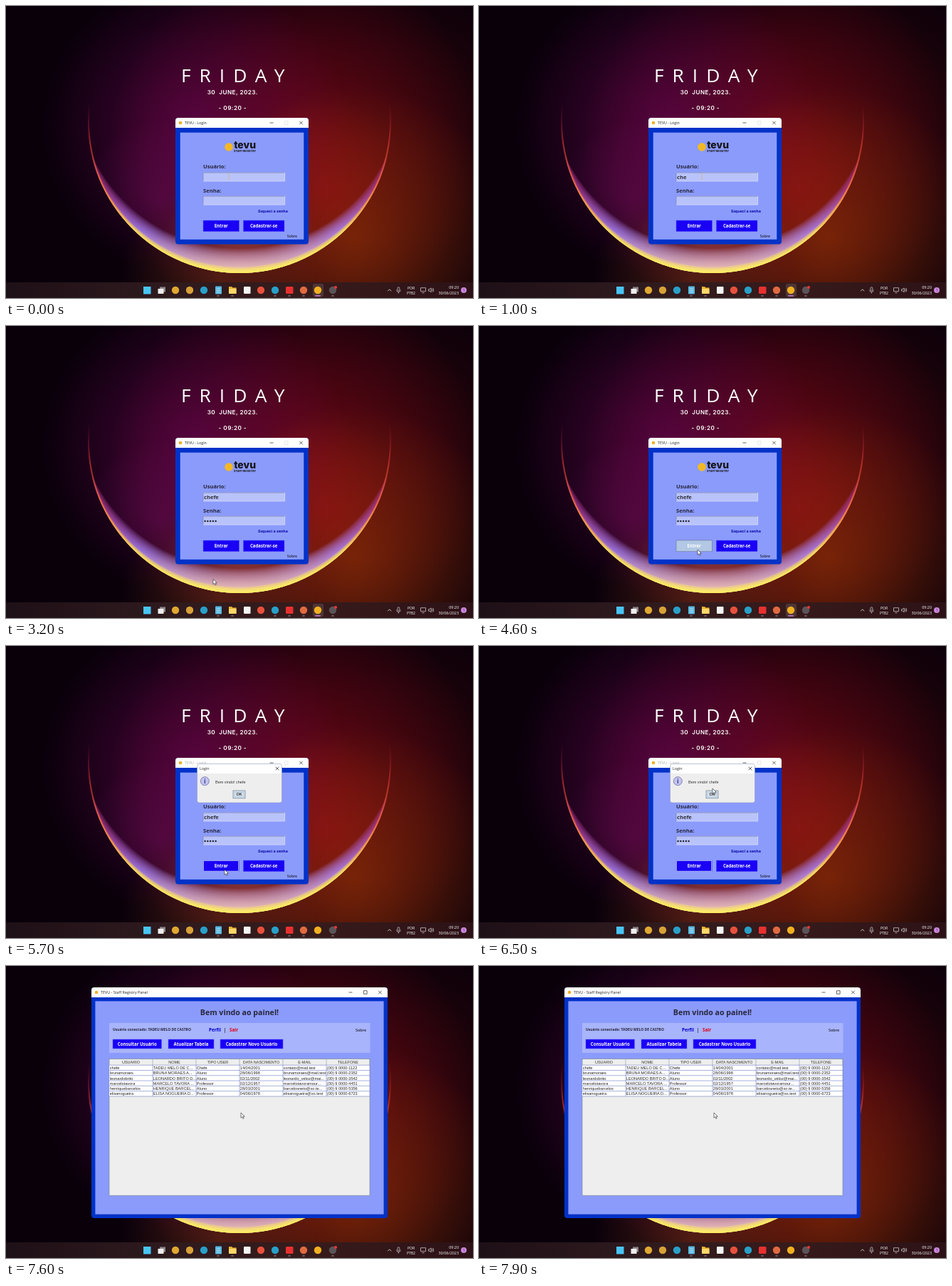
Recreate the animation shown at these times as an HTML page with a canvas. Size 656 by 410 pixels, loop 8000 ms.

```html
<!DOCTYPE html>
<html lang="pt-BR">
<head>
<meta charset="utf-8">
<title>Login</title>
<style>
html, body { margin: 0; width: 100%; height: 100%; overflow: hidden; background: #08000a; }
canvas, svg { position: absolute; left: 0; top: 0; width: 656px; height: 410px; }
text { white-space: pre; font-family: "Open Sans", "Noto Sans", sans-serif; }
.b { font-weight: 700; }
.m { font-weight: 600; }
.arial { font-family: "Liberation Sans", Arial, sans-serif; }
.geo { font-family: Inter, sans-serif; font-weight: 600; letter-spacing: .45px; }
.logo { font-family: Inter, sans-serif; font-weight: 800; }
.wide { letter-spacing: 12px; }
</style>
</head>
<body>
<canvas id="wall" width="656" height="410"></canvas>
<svg id="stage" viewBox="0 0 656 410"></svg>
<script>
const LOOP = 8000;
const BLUE = '#0032c8', PANEL = '#8b9bfc', BUTTON = '#1a00f5', INK = '#26263a';

// Wallpaper
const g = document.getElementById('wall').getContext('2d');

function glow(x, y, r, rgb, alpha) {
  const grad = g.createRadialGradient(x, y, 0, x, y, r);
  grad.addColorStop(0, `rgba(${rgb},${alpha})`);
  grad.addColorStop(0.5, `rgba(${rgb},${alpha * 0.5})`);
  grad.addColorStop(1, `rgba(${rgb},0)`);
  g.fillStyle = grad;
  g.fillRect(0, 0, 656, 410);
}

function vertical(stops) {
  const grad = g.createLinearGradient(0, 135, 0, 375);
  stops.forEach((c, i) => grad.addColorStop(i / (stops.length - 1), c));
  return grad;
}

function paintWall() {
  const cx = 328, cy = 162, R = 213, layers = 24;
  g.fillStyle = '#09000a';
  g.fillRect(0, 0, 656, 410);
  glow(410, 195, 265, '128,4,28', 0.85);
  glow(265, 170, 215, '98,6,78', 0.75);
  glow(530, 200, 270, '96,14,10', 0.45);
  glow(490, 325, 215, '150,52,4', 0.65);
  glow(300, 385, 140, '130,55,25', 0.5);

  g.save();
  g.beginPath();
  g.arc(cx, cy, R, 0, Math.PI * 2);
  g.clip();
  glow(450, 260, 130, '165,16,24', 0.4);
  glow(215, 270, 110, '120,16,100', 0.4);
  glow(328, 365, 120, '200,90,110', 0.45);

  const rim = vertical(['#a0144000', '#e03c34', '#f57838', '#ffe050', '#fff060']);
  const haze = vertical(['#7a106000', '#a02060', '#a83c98', '#b088ff', '#ffd8c8']);
  for (let i = layers; i > 0; i--) {
    const t = i / layers, isRim = t < 0.28;
    g.globalAlpha = isRim ? 0.3 : 0.09;
    g.fillStyle = isRim ? rim : haze;
    g.beginPath();
    g.rect(0, 0, 656, 410);
    g.arc(cx, cy - 50 * t, R + 16 * t, 0, Math.PI * 2);
    g.fill('evenodd');
  }
  g.globalAlpha = 0.65;
  g.strokeStyle = rim;
  g.lineWidth = 4;
  g.beginPath();
  g.arc(cx, cy, R, 0, Math.PI * 2);
  g.stroke();
  g.restore();

  const bar = g.createLinearGradient(0, 0, 656, 0);
  ['#1e1017', '#2e1a1e', '#371b1b', '#2c1116'].forEach((c, i) => bar.addColorStop(i / 3, c));
  g.fillStyle = bar;
  g.fillRect(0, 388, 656, 22);
}

// Markup helpers; text is placed by its vertical centre
const rect = (x, y, w, h, fill, more = '') =>
  `<rect x="${x}" y="${y}" width="${w}" height="${h}" fill="${fill}" ${more}/>`;
const dot = (x, y, r, fill, more = '') => `<circle cx="${x}" cy="${y}" r="${r}" fill="${fill}" ${more}/>`;
const line = (d, stroke, w = 0.7) => `<path d="${d}" fill="none" stroke="${stroke}" stroke-width="${w}"/>`;
const text = (x, y, size, str, fill = INK, cls = '', anchor = 'start', id = '') =>
  `<text x="${x}" y="${y + size * 0.36}" font-size="${size}" fill="${fill}" class="${cls}" text-anchor="${anchor}" ${id && `id="${id}"`}>${str}</text>`;
const group = (id, body) => `<g id="${id}">${body}</g>`;

const button = (x, y, w, h, label, size = 6.1) =>
  rect(x, y, w, h, BUTTON, 'stroke="#5a5cff" stroke-width=".5"') +
  text(x + w / 2, y + h / 2, size, label, '#fff', 'b', 'middle');

const field = (y) =>
  rect(277, y, 115, 12.5, '#b9c3fb') +
  line(`M277 ${y + 12.5}V${y + 0.4}H392`, '#7f86a8') +
  line(`M277 ${y + 12.2}H391.7V${y}`, '#d4dafc');

const cross = (x, y, c = '#222') =>
  line(`M${x - 2.3} ${y - 2.3}l4.6 4.6m0-4.6l-4.6 4.6`, c);

const frame = (x, y, w, h, inset, title, maxColor) =>
  rect(x, y, w, h, BLUE, 'rx="4"') +
  `<path d="M${x} ${y + 14}v-10q0-4 4-4h${w - 8}q4 0 4 4v10z" fill="#fff"/>` +
  rect(x + inset, y + 14 + inset, w - 2 * inset, h - 14 - 2 * inset, PANEL) +
  dot(x + 7, y + 7, 2.3, '#f0b020') + title +
  line(`M${x + w - 54.5} ${y + 7}h5`, '#222') +
  line(`M${x + w - 33.5} ${y + 4.7}h4.6v4.6h-4.6z`, maxColor) +
  cross(x + w - 10.5, y + 7);

// Scene parts
const desktop =
  text(246, 98, 26.3, 'FRIDAY', '#fff', 'wide') +
  text(318.3, 121, 8.2, '30  JUNE, 2023.', '#fff', 'geo', 'middle') +
  text(318.3, 143, 8.2, '- 09:20 -', '#fff', 'geo', 'middle');

const icons = [
  [238, '#e0a830'], [258, '#d8a038'], [278, '#28a0c8'], [378, '#28a0c8'],
  [358, '#e8503c'], [418, '#e06a40'], [438, '#f0b020'], [459, '#5a5458']
];
const taskbar =
  rect(193, 394, 10.5, 10.5, '#48c4f4') +
  rect(216, 394.5, 8, 7, '#8c8688') + rect(213.5, 397, 8, 7, '#f0eeee') +
  group('activeApp', rect(431, 390, 15, 18, '#fff', 'opacity=".12" rx="2"') + rect(434, 406.3, 8, 1.4, '#d080e0', 'rx=".7"')) +
  icons.map(([x, c]) => dot(x, 399, 5.2, c)).join('') +
  rect(294, 393.5, 9, 11, '#58b8e0', 'rx="1"') + line('M296 397h5m-5 2.5h5m-5 2.5h5', '#e8f6ff', 0.6) +
  '<path d="M313 394h4l1.5 1.5h5v8.5h-10.5z" fill="#e8b030"/>' + rect(313, 397, 10.5, 7, '#ffd868', 'rx=".7"') +
  rect(334, 394, 9.5, 10, '#f4f4f4', 'rx="1"') +
  rect(393, 394, 10.5, 10, '#e83030', 'rx="1.5"') +
  dot(463, 395, 2.1, '#e83838') +
  [298, 318, 378, 398, 418, 459].map(x => rect(x - 1.7, 406.5, 3.4, 1, '#a8a0a2', 'rx=".5"')).join('') +
  line('M536.2 400.3l2.5-2.5 2.5 2.5', '#eee', 0.8) +
  rect(550, 394.8, 2.8, 5, 'none', 'rx="1.4" stroke="#ddd" stroke-width=".7"') +
  line('M548.7 398.6q0 3 2.7 3t2.7-3m-2.7 3v2', '#ddd') +
  text(569, 396, 5.1, 'POR', '#fff', '', 'middle') + text(569, 403, 5.1, 'PTB2', '#fff', '', 'middle') +
  line('M582.5 395.7h7v5h-7zm2 7h3', '#ddd') +
  line('M593.5 397.7h1.6l2-1.8v6l-2-1.8h-1.6zm5-.5q1 1.6 0 3.2m1.3-4.4q1.8 2.8 0 5.6', '#ddd') +
  text(636, 395.3, 5.4, '09:20', '#fff', '', 'end') + text(636, 403, 5.4, '30/06/2023', '#fff', '', 'end') +
  dot(643, 399, 4, '#c987dc') + text(643, 399, 4.8, '1', '#301838', '', 'middle');

const login =
  frame(238, 157, 187, 177.5, 6.7, text(251, 164, 5.3, 'TEVU - Login', '#222', '', 'start', 'loginTitle'), '#ddd') +
  dot(313, 198, 5.8, '#f2b824') +
  text(335.6, 195, 14, 'tevu', '#141414', 'logo', 'middle') +
  text(335.6, 204, 3.7, 'STAFF REGISTRY', '#222', 'logo', 'middle') +
  text(277, 225, 7.6, 'Usuário:', INK, 'b') + field(233.7) +
  text(277, 258.8, 7.6, 'Senha:', INK, 'b') + field(266.8) +
  text(278, 240, 7.6, '', '#303038', 'b', 'start', 'user') +
  group('dots', [0, 1, 2, 3, 4].map(i => dot(279.6 + i * 3.75, 274, 1.2, '#22222c')).join('')) +
  rect(278, 268.8, 0.7, 9, '#222', 'id="caret"') +
  text(396, 288, 5.3, 'Esqueci a senha', '#0a0aa4', 'b', 'end') +
  button(277, 301, 50.5, 15.7, 'Entrar') +
  button(333.3, 301, 57.7, 15.7, 'Cadastrar-se') +
  group('focusRing', rect(277.3, 301.3, 49.4, 15, 'none', 'stroke="#a4b4f4" stroke-width="1.1"')) +
  group('pressed', rect(277, 301, 50.5, 15.7, '#b2c8e4', 'stroke="#7f8ba4" stroke-width=".7"') +
    text(302.2, 308.9, 6.1, 'Entrar', '#fff', 'b', 'middle')) +
  text(409, 323, 5.2, 'Sobre', INK, 'm', 'end');

const dialog =
  rect(268.5, 165.5, 119, 54.5, '#eee', 'rx="3" stroke="#8890b8" stroke-width=".5"') +
  '<path d="M269 179v-10q0-3 3-3h112q3 0 3 3v10z" fill="#fff"/>' +
  text(272, 172, 5.4, 'Login', '#222') + cross(381, 172) +
  dot(279.3, 189.7, 6, '#c4c4f0', 'stroke="#6c6ca8" stroke-width=".8"') +
  text(279.3, 189.7, 9, 'i', '#40408c', 'b', 'middle') +
  text(294, 191, 5.5, 'Bem vindo! chefe', '#333', 'arial') +
  rect(319, 203, 17, 10.8, '#d5e2ee', 'id="ok" stroke="#7a8a99" stroke-width=".8"') +
  rect(321, 205, 13, 6.8, 'none', 'stroke="#a3b8cc" stroke-width=".5"') +
  text(327.5, 208.5, 5.4, 'OK', '#333', 'arial b', 'middle');

const columns = ['USUARIO', 'NOME', 'TIPO USER', 'DATA NASCIMENTO', 'E-MAIL', 'TELEFONE'];
const people = [
  'chefe|TADEU MELO DE C...|Chefe|14/04/2001|contato@mail.test|(00) 9 0000-1122',
  'brunamoraes|BRUNA MORAES A...|Aluno|28/06/1998|brunamoraes@mail.test|(00) 9 0000-2352',
  'leonardobrito|LEONARDO BRITO D...|Aluno|02/11/2002|leonardo_veloz@mai...|(00) 9 0000-3542',
  'marcelotavora|MARCELO TAVORA ...|Professor|02/12/1957|marcelotavoramour...|(00) 9 0000-4451',
  'henriquebarcelos|HENRIQUE BARCEL...|Aluno|28/03/2001|barcelosneto@xo.te...|(00) 9 0000-5356',
  'elisanogueira|ELISA NOGUEIRA D...|Professor|04/06/1978|elisanogueira@xo.test|(00) 9 0000-6723'
].map(row => row.split('|'));

const colX = i => 145 + i * 61, rowY = i => 139.2 + i * 7.3;
const table =
  rect(145, 130.5, 366, 191.7, '#eee', 'stroke="#7a8a99" stroke-width=".7"') +
  rect(145, 139.2, 366, 43.8, '#fff') +
  columns.map((name, i) =>
    text(colX(i) + 30.5, 135.2, 5.5, name, '#333', 'arial', 'middle') +
    line(`M${colX(i + 1)} 130.5V139`, '#8f9cab', 0.6) +
    line(`M${colX(i + 1)} 139V183`, '#6f7fc4', 0.6)).join('') +
  people.map((row, r) =>
    row.map((cell, i) => text(colX(i) + 0.8, rowY(r) + 3.7, 5.6, cell, '#222', 'arial')).join('') +
    line(`M145 ${rowY(r)}H511`, '#6f7fc4', 0.6)).join('') +
  line('M145 183H511', '#6f7fc4', 0.6);

const panel =
  frame(120, 30, 416, 324, 5.4, text(133, 37, 5.4, 'TEVU - Staff Registry Panel', '#222'), '#222') +
  text(328, 65, 10.6, 'Bem vindo ao painel!', INK, 'b', 'middle') +
  rect(145, 80, 366.5, 42, '#a8b4fb') +
  text(150, 88.7, 5, 'Usuário conectado: TADEU MELO DE CASTRO', INK, 'b') +
  text(285, 90, 6.3, 'Perfil', '#0000d0', 'b') + text(307.6, 90, 6.3, '|', INK, 'b', 'middle') +
  text(314, 90, 6.3, 'Sair', '#e00018', 'b') + text(506, 90, 5.4, 'Sobre', INK, 'm', 'end') +
  button(150, 103, 68.5, 13, 'Consultar Usuário') +
  button(228, 103, 64, 13, 'Atualizar Tabela') +
  button(301, 103, 88, 13, 'Cadastrar Novo Usuário') +
  table;

const pointers =
  group('beam', line('M-1.5-3.8h3m-1.5 0v7.6m-1.5 0h3', '#c9b78c', 0.8)) +
  group('arrow', '<path d="M0 0v7.2l1.7-1.5 1.2 2.7 1.3-.6-1.2-2.6h2.3z" fill="#fff" stroke="#222" stroke-width=".6"/>');

paintWall();
document.getElementById('stage').innerHTML =
  desktop + taskbar + group('login', login) + group('dialog', dialog) + group('panel', panel) + pointers;

// Timeline
const el = id => document.getElementById(id);
const show = (id, on) => { el(id).style.display = on ? '' : 'none'; };
const within = (t, a, b) => t >= a && t < b;
const countPast = (times, t) => times.filter(k => t >= k).length;

const letterTimes = [700, 900, 1000, 1100, 1300];
const dotTimes = [1800, 1900, 2000, 2200, 2300];
const path = [
  [0, 313, 239], [2400, 313, 239], [3200, 291, 355.5], [4200, 307, 314],
  [5900, 307, 314], [6300, 329, 186], [6500, 328, 200], [6800, 330, 201], [6900, 330, 206], [LOOP, 330, 206]
];

function pointerAt(t) {
  const i = path.findIndex(p => p[0] > t);
  const [t0, x0, y0] = path[i - 1], [t1, x1, y1] = path[i];
  const u = (t - t0) / (t1 - t0), k = u * u * (3 - 2 * u);
  return [x0 + (x1 - x0) * k, y0 + (y1 - y0) * k];
}

function render(t) {
  const typed = countPast(letterTimes, t), filled = countPast(dotTimes, t);
  const dialogOpen = within(t, 5200, 7000), panelOpen = t >= 7600;
  el('user').textContent = 'chefe'.slice(0, typed);
  [...el('dots').children].forEach((d, i) => { d.style.display = i < filled ? '' : 'none'; });

  show('caret', within(t, 1400, 2600));
  el('caret').setAttribute('x', 278.2 + filled * 3.65);

  show('pressed', within(t, 4400, 5200));
  show('focusRing', t >= 5200);
  show('dialog', dialogOpen);
  show('login', !panelOpen);
  show('panel', panelOpen);
  show('activeApp', !dialogOpen && !panelOpen);
  el('loginTitle').setAttribute('fill', dialogOpen ? '#aaa' : '#222');
  el('ok').setAttribute('fill', t >= 6900 ? '#b8cfe5' : '#d5e2ee');

  const [x, y] = pointerAt(t), beam = t < 2500;
  show('beam', beam);
  show('arrow', !beam);
  el(beam ? 'beam' : 'arrow').setAttribute('transform', `translate(${x} ${y})`);
}

const start = performance.now();
function tick() {
  const t = (performance.now() - start) % LOOP;
  render(Math.floor(t / 100) * 100);
  requestAnimationFrame(tick);
}
tick();
</script>
</body>
</html>
```
